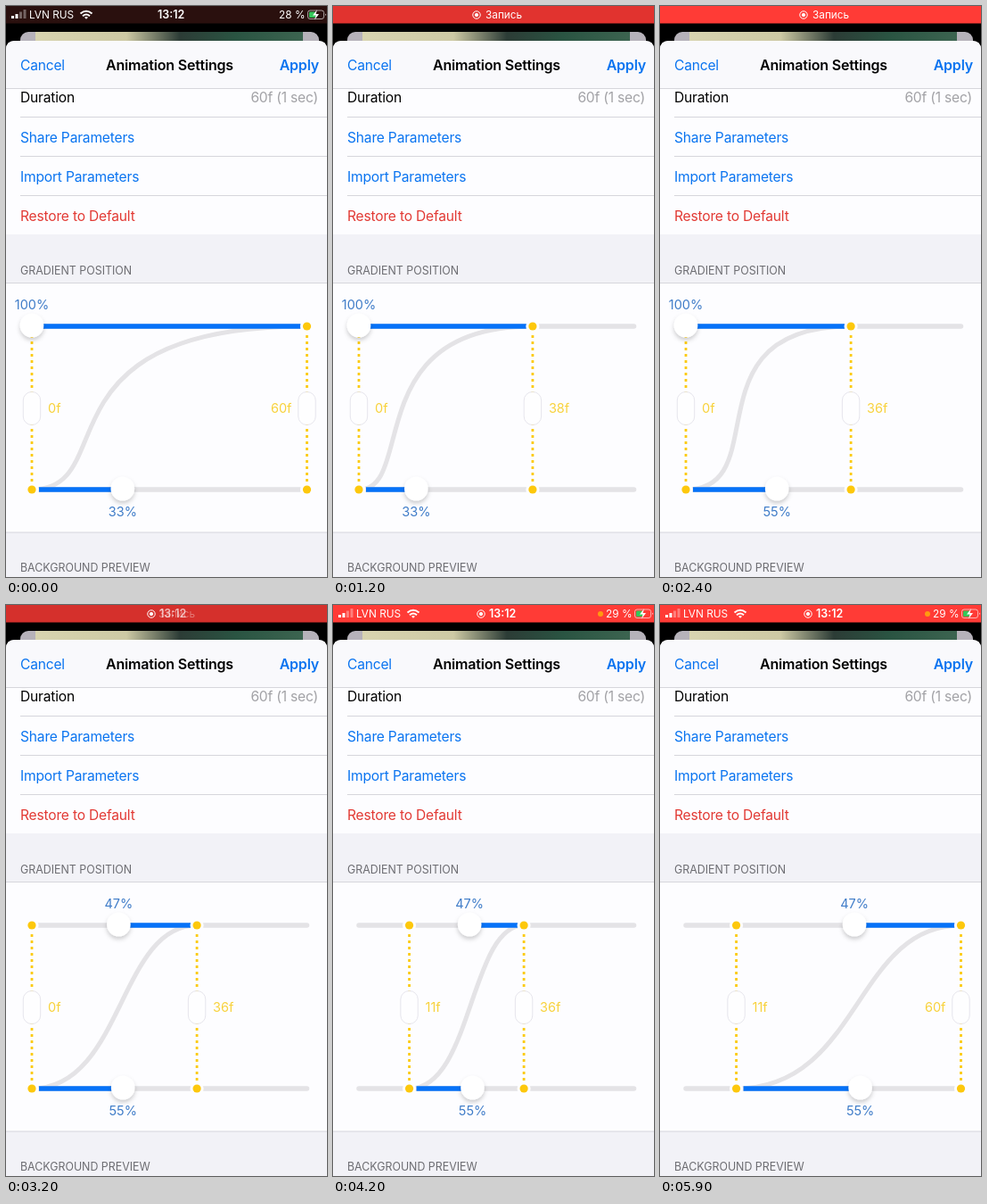
Write an HTML page that moves like this. It is 360 by 640 pixels and loops after 6000 ms.

```html
<!DOCTYPE html>
<html lang="en">
<head>
<meta charset="utf-8">
<title>Animation Settings</title>
<style>
  html, body { margin: 0; width: 100%; height: 100%; overflow: hidden; background: #000; }
  svg { display: block; width: 360px; height: 640px; font: 15.6px Inter, sans-serif; }
  .row { letter-spacing: -.2px; }
  .bold { font-size: 16px; font-weight: 600; letter-spacing: -.2px; }
  .section { font-size: 12.4px; fill: #6d6d72; }
  .status { font-size: 11.8px; fill: #fff; }
  .link { fill: #0a74f0; }
  .line { stroke: #d6d6dc; }
  .percent { font-size: 14.5px; fill: #3f7cc8; text-anchor: middle; }
  .frame { font-size: 14.5px; fill: #f8d23c; }
  .track, .range, #curve { fill: none; stroke: #e4e3e6; stroke-width: 5.5; stroke-linecap: round; }
  .range { stroke: #0672f8; stroke-linecap: butt; }
  #curve { stroke-width: 5; }
  .dots { stroke: #fccb14; stroke-width: 2.8; stroke-dasharray: 2.9 4.1; }
  .dot { fill: #fdc80c; stroke: #fdfdff; stroke-width: 6; paint-order: stroke; }
  .knob { fill: #fff; filter: url(#shadow); }
  .pill { fill: #fefeff; stroke: #e4e3ea; stroke-width: .9; }
</style>
</head>
<body>
<svg viewBox="0 0 360 640">
  <defs>
    <linearGradient id="photo">
      <stop offset="0" stop-color="#d8d4b0"/>
      <stop offset=".34" stop-color="#cdc9a4"/>
      <stop offset=".54" stop-color="#2c3c36"/>
      <stop offset=".75" stop-color="#2a5442"/>
      <stop offset="1" stop-color="#3c6450"/>
    </linearGradient>
    <filter id="shadow" x="-50%" y="-50%" width="200%" height="200%">
      <feDropShadow dx="0" dy="3" stdDeviation="2.6" flood-color="#000" flood-opacity=".2"/>
    </filter>
  </defs>

  <rect width="360" height="640"/>
  <rect id="bar" width="360" height="19.500"/>
  <g id="sides" class="status">
    <path d="M6 11h3v3h-3zM10.500 9h3v5h-3z"/>
    <path d="M15 6.500h3v7.500h-3zM19.500 4h3v10h-3z" opacity=".35"/>
    <text x="26" y="14">LVN RUS</text>
    <path d="M83.500 8.500q6.500-5.500 13 0M86 11.300q4-3.500 8 0" fill="none" stroke="#fff" stroke-width="2"/>
    <path d="M90 14.800l-2-2q2-1.600 4 0z"/>
    <text id="charge" x="335.500" y="14" text-anchor="end"></text>
    <rect x="338.500" y="5" width="18" height="9.500" rx="2.500" fill="none" stroke="#fff" stroke-opacity=".6"/>
    <rect x="340" y="6.500" width="7" height="6.500" rx="1" fill="#34c759"/>
    <path d="M349 4l-5 6.500h3.500l-1.500 5 5-6.500h-3.500z"/>
    <path d="M358 8.500v2.500q1.800-1.200 0-2.500"/>
  </g>
  <circle id="mic" cx="300" cy="10" r="3" fill="#ff9a10"/>
  <g id="record" fill="none" stroke="#fff">
    <circle cy="10" r="4.200"/><circle cy="10" r="1.700" fill="#fff"/>
  </g>
  <text id="label" class="status" x="171" y="14">Запись</text>
  <text id="clock" class="status" y="14" style="font-size:12.5px;font-weight:600">13:12</text>

  <rect x="16" y="29" width="335" height="30" rx="9" fill="#b6b2ba"/>
  <rect x="33" y="29" width="300" height="20" fill="url(#photo)"/>

  <path d="M0 640V49q0-10 10-10h340q10 0 10 10v591z" fill="#f2f2f7"/>
  <path d="M0 92V49q0-10 10-10h340q10 0 10 10v43z" fill="#f9f9fc"/>
  <path d="M0 93h360v163H0zM0 311h360v279H0z" fill="#fdfdff"/>
  <path class="line" d="M0 92.500h360M16 124.500h344M16 168.500h344M16 212.500h344M0 310.500h360M0 590h360"/>
  <g class="row">
    <text x="16" y="71.500" class="link">Cancel</text>
    <text x="183.500" y="71.500" class="bold" text-anchor="middle">Animation Settings</text>
    <text x="351" y="71.500" class="bold link" text-anchor="end">Apply</text>
    <text x="16" y="108">Duration</text>
    <text x="350" y="108" text-anchor="end" fill="#a2a2a6">60f (1 sec)</text>
    <text x="16" y="152.500" class="link">Share Parameters</text>
    <text x="16" y="196.500" class="link">Import Parameters</text>
    <text x="16" y="241" fill="#e23a34">Restore to Default</text>
  </g>
  <text x="16" y="301" class="section">GRADIENT POSITION</text>
  <text x="16" y="634" class="section">BACKGROUND PREVIEW</text>

  <path id="curve"/>
  <path class="track" d="M29 359H337.500M29 542H337.500"/>
  <path id="ranges" class="range"/>
  <g id="start"></g>
  <g id="end"></g>
  <circle id="topKnob" class="knob" cy="358" r="13.300"/>
  <circle id="bottomKnob" class="knob" cy="541" r="13.300"/>
  <text id="topText" class="percent" y="339.500"></text>
  <text id="bottomText" class="percent" y="571.500"></text>
</svg>

<script>
const LOOP = 6000, LEFT = 29, WIDTH = 308.5, TOP = 359, BOTTOM = 542;
const $ = id => document.getElementById(id);
const set = (id, attrs) => {
  for (const key in attrs) $(id).setAttribute(key, attrs[key]);
};
const clamp = v => Math.min(1, Math.max(0, v));
const ramp = (t, from, to) => {
  const u = clamp((t - from) / (to - from));
  return u * u * (3 - 2 * u);
};
const mix = (a, b, u) => a + (b - a) * u;
const mixColor = (a, b, u) => `rgb(${a.map((v, i) => Math.round(mix(v, b[i], u)))})`;

for (const id of ['start', 'end']) {
  $(id).innerHTML = `
    <path class="dots" d="M0 369V534"/>
    <circle class="dot" cy="${TOP}" r="4.6"/>
    <circle class="dot" cy="${BOTTOM}" r="4.6"/>
    <rect class="pill" x="-9.700" y="432.500" width="19.400" height="37" rx="9.500"/>
    <text class="frame" y="456"></text>`;
}

function marker(id, frame) {
  const x = LEFT + frame * WIDTH / 60;
  const text = $(id).querySelector('text');
  const flip = x > 305;
  set(id, { transform: `translate(${x} 0)` });
  text.textContent = Math.round(frame) + 'f';
  text.setAttribute('x', flip ? -17 : 18);
  text.setAttribute('text-anchor', flip ? 'end' : 'start');
  return x;
}

function knob(name, x, share) {
  set(name + 'Knob', { cx: x });
  set(name + 'Text', { x });
  $(name + 'Text').textContent = Math.round(share * 100) + '%';
}

function drawStatus(t) {
  const pulse = .5 + .5 * Math.cos((t - 2400) / 1750 * 2 * Math.PI);
  const red = mixColor([212, 48, 44], [255, 59, 54], pulse).match(/\d+/g).map(Number);
  const shown = ramp(t, 250, 550) * (1 - ramp(t, 3050, 3300));
  const back = ramp(t, 3050, 3400);
  set('bar', { fill: mixColor([42, 16, 14], red, ramp(t, 0, 500)) });
  set('label', { opacity: shown });
  set('clock', { opacity: 1 - shown, x: mix(170, 175, back) });
  set('record', { opacity: ramp(t, 250, 550), transform: `translate(${mix(161, 166, back)} 0)` });
  set('sides', { opacity: 1 - ramp(t, 250, 550) + ramp(t, 3250, 3500) });
  set('mic', { opacity: ramp(t, 3250, 3500) });
  $('charge').textContent = t < 2000 ? '28 %' : '29 %';
}

function drawGraph(t) {
  const topShare = mix(1, .474, ramp(t, 2480, 3120));
  const bottomShare = mix(.33, .552, ramp(t, 1600, 2300));
  const x0 = marker('start', 11 * ramp(t, 3450, 4120));
  const x1 = marker('end', 60 - 24 * ramp(t, 250, 1400) + 24 * ramp(t, 4270, 4860));
  const topX = mix(x1, x0, topShare);
  const bottomX = mix(x0, x1, bottomShare);
  knob('top', topX, topShare);
  knob('bottom', bottomX, bottomShare);
  set('ranges', { d: `M${topX} ${TOP}H${x1 - 7}M${x0 + 8} ${BOTTOM}H${bottomX}` });
  set('curve', { d: `M${x0} ${BOTTOM}C${bottomX} ${BOTTOM} ${topX} ${TOP} ${x1} ${TOP}` });
}

const begin = performance.now();
function draw() {
  const t = (performance.now() - begin) % LOOP;
  drawStatus(t);
  drawGraph(t);
  requestAnimationFrame(draw);
}
draw();
</script>
</body>
</html>
```
